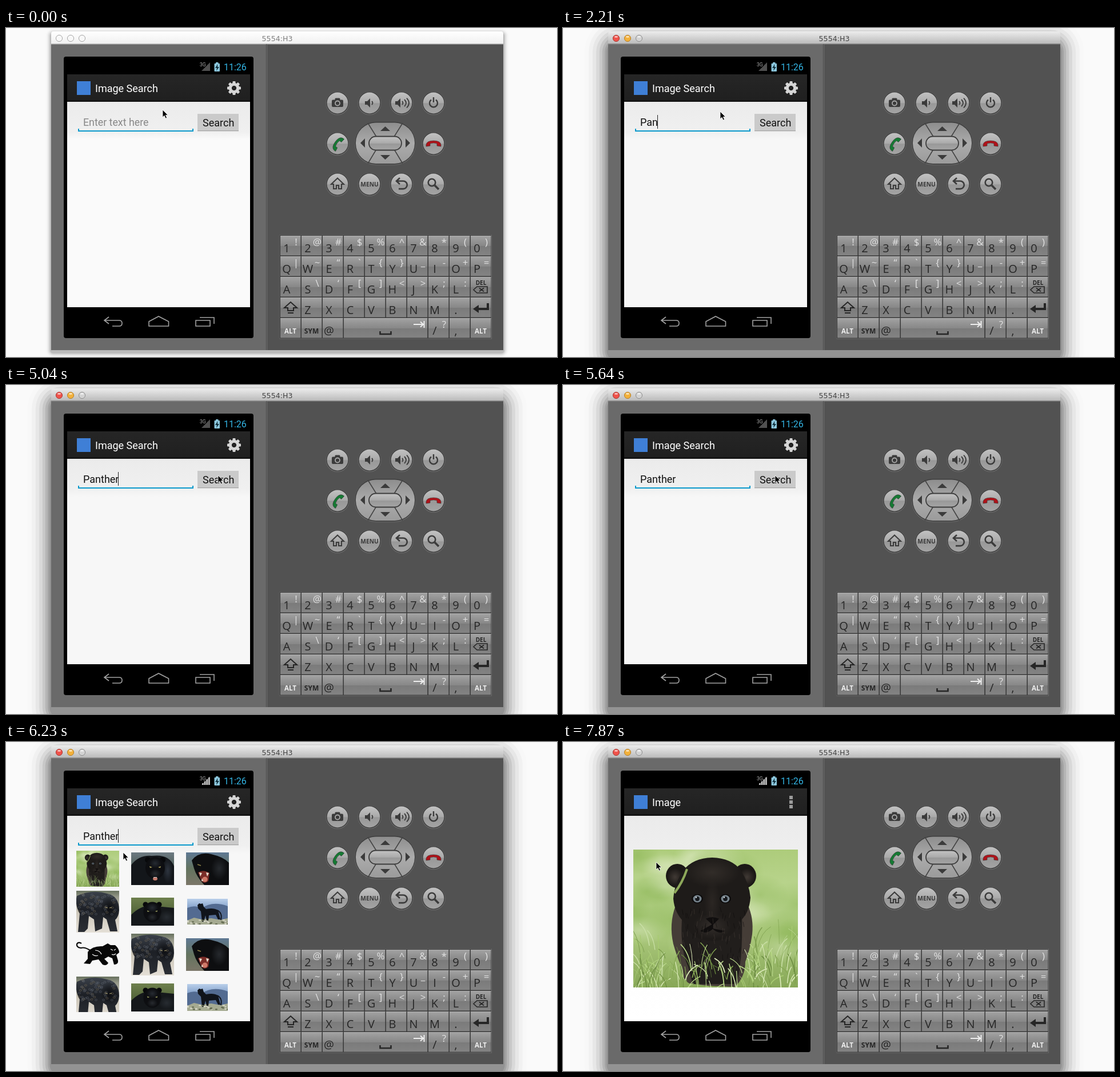
Animation of 964x575 px, one loop 8 s. Source, as an HTML page with a canvas:

```html
<!DOCTYPE html>
<html lang="en">
<head>
<meta charset="utf-8">
<title>Emulator image search</title>
<style>
html, body { margin: 0; width: 100%; height: 100%; overflow: hidden; background: #fafafa; }
canvas { display: block; }
</style>
</head>
<body>
<canvas id="stage" width="964" height="575"></canvas>
<script>
const c = document.getElementById('stage').getContext('2d');
const LOOP = 8000;
const STEPS = [0, 300, 430, 560, 1010, 1460, 1910, 2210, 2510, 2660, 2800, 2950, 3550,
  3840, 3990, 4140, 4290, 4440, 4590, 5040, 5340, 5490, 5640, 5780, 5930, 6080, 6230,
  6380, 6530, 6670, 6970, 7120, 7270, 7420, 7570, 7870];
const TYPED = [1460, 1910, 2210, 2510, 2660, 2800, 2950];
const CARET = [[560, 1010], [1460, 3550], [3990, 4590], [5040, 5490], [6080, 6670], [6970, 7570]];
const MOUSE = [[0, 274, 143], [300, 274, 143], [430, 275, 146], [3690, 275, 146],
  [4440, 371, 158], [5640, 371, 158], [6230, 205, 193], [6530, 163, 210], [8000, 163, 210]];
const UI = 'Roboto, sans-serif', KEY = '"Open Sans", "Noto Sans", sans-serif';

// Drawing helpers
function rect(x, y, w, h, fill) { c.fillStyle = fill; c.fillRect(x, y, w, h); }
function round(x, y, w, h, r, fill, stroke, lw = 1) {
  c.beginPath(); c.roundRect(x, y, w, h, r); paint(fill, stroke, lw);
}
function oval(x, y, rx, ry, fill, stroke, lw = 1) {
  c.beginPath(); c.ellipse(x, y, rx, ry, 0, 0, 7); paint(fill, stroke, lw);
}
function paint(fill, stroke, lw) {
  if (fill) { c.fillStyle = fill; c.fill(); }
  if (stroke) { c.strokeStyle = stroke; c.lineWidth = lw; c.stroke(); }
}
function path(d, fill, stroke, lw = 1) {
  const p = new Path2D(d);
  if (fill) { c.fillStyle = fill; c.fill(p); }
  if (stroke) { c.strokeStyle = stroke; c.lineWidth = lw; c.stroke(p); }
}
function text(s, x, y, size, fill, font = UI, align = 'left', weight = 400) {
  c.font = `${weight} ${size}px ${font}`;
  c.textAlign = align;
  c.fillStyle = fill;
  c.fillText(s, x, y);
}
function grad(y0, y1, ...stops) {
  const g = c.createLinearGradient(0, y0, 0, y1);
  stops.forEach(([p, col]) => g.addColorStop(p, col));
  return g;
}
// Soft spot: rgb is "r,g,b"
function glow(x, y, rx, ry, rgb, alpha) {
  at(x, y, () => {
    c.scale(rx, ry);
    const g = c.createRadialGradient(0, 0, 0, 0, 0, 1);
    g.addColorStop(0, `rgba(${rgb},${alpha})`);
    g.addColorStop(1, `rgba(${rgb},0)`);
    rect(-1, -1, 2, 2, g);
  });
}
function at(x, y, draw, turn = 0) {
  c.save(); c.translate(x, y); c.rotate(turn); draw(); c.restore();
}
function random(seed) {
  return () => (seed = (seed * 16807) % 2147483647) / 2147483647;
}

// Desktop window
function shadow(reach, drop, depth) {
  for (let i = 0; i <= 8; i++) {
    const d = reach * Math.pow(1 - i / 9, 1.5) + 1;
    const v = Math.round(250 - depth * Math.pow(1 - d / (reach + 3), 2.4));
    round(79 - d, 6 + drop - d, 791 + 2 * d, 557 + 2 * d, d + drop, `rgb(${v},${v},${v})`);
  }
}
function desktop(active) {
  rect(0, 0, 964, 575, '#fafafa');
  if (active) shadow(48, 18, 118); else shadow(9, 4, 85);
  const bar = active ? grad(6, 28, [0, '#ececec'], [1, '#b9b9b9']) : grad(6, 28, [0, '#fff'], [1, '#f0f0f0']);
  round(79, 6, 791, 24, [4, 4, 0, 0], bar);
  rect(79, 27.5, 791, 1, active ? '#6c6c6c' : '#a0a0a0');
  const lights = active ? ['#f0524a', '#f3b13b', '#d3d3d3'] : ['#f8f8f8', '#f8f8f8', '#f8f8f8'];
  const rims = active ? ['#a83a35', '#b5802c', '#909090'] : ['#a8a8a8', '#a8a8a8', '#a8a8a8'];
  lights.forEach((col, i) => {
    const x = 93 + 20 * i;
    oval(x, 18, 5.6, 5.6, col, rims[i]);
    if (active) oval(x, 15.3, 3, 1.6, 'rgba(255,255,255,.6)');
  });
  text('5554:H3', 474.5, 22.5, 12.6, active ? '#444' : '#808080', '"DejaVu Sans", sans-serif', 'center');
  rect(79, 28.5, 376, 534.5, '#6a6a6a');
  rect(455, 28.5, 415, 534.5, '#525252');
  rect(455, 28.5, 1, 534.5, '#454545');
  rect(456, 28.5, 1, 534.5, '#757575');
}

// Hardware buttons
const INK = '#3b3b3b';
const ICONS = [
  [580, 131, () => {
    round(-10, -5.5, 20, 12.5, 2, INK);
    round(-4.5, -8.5, 9, 5, 1.5, INK);
    oval(0, .5, 4, 4, INK, '#a8a8a8', 1.8);
  }],
  [636, 131, () => { speaker(-8); path('M4-3q3 3 0 6', null, INK, 1.8); }],
  [692, 131, () => {
    speaker(-11);
    path('M1-3q3 3 0 6M5-6q6 6 0 12M9-8.5q8 8.5 0 17', null, INK, 1.8);
  }],
  [748, 131, () => path('M-4-5.5A7 7 0 1 0 4-5.5M0-10V-1', null, INK, 2.4)],
  [580, 202, () => at(0, 0, () => handset('#157a33'), -.95)],
  [748, 202, () => handset('#b01219')],
  [580, 273, () => path('M-11 0L0-10.500L11 0H7V8H2V2H-2V8H-7V0Z', null, INK, 2)],
  [636, 273, () => text('MENU', 0, 4, 10.3, INK, KEY, 'center', 700)],
  [692, 273, () => path('M-3-11L-9-5.5L-3 0M-9-5.5H3a6.8 6.8 0 0 1 0 13.6H-5', null, INK, 2.6)],
  [748, 273, () => { oval(-3, -3, 6.3, 6.3, null, INK, 2.6); path('M2 2L9 9', null, INK, 3.6); }]
];
function speaker(x) { path(`M${x}-3h4l5-5v16l-5-5h-4Z`, INK); }
function handset(col) {
  path('M-13 5V2Q-12-5 0-5Q12-5 13 2V5L6 4V0Q0-2-6 0V4Z', col, '#333', .6);
}
function hardware() {
  const shine = (y0, y1) => grad(y0, y1, [0, '#c2c2c2'], [.3, '#b4b4b4'], [.5, '#a9a9a9'], [.52, '#989898'], [1, '#a4a4a4']);
  for (const [x, y, icon] of ICONS) {
    oval(x, y + .5, 20.5, 20.5, '#6c6c6c');
    oval(x, y, 19.8, 19.8, '#3c3c3c');
    oval(x, y, 18.4, 18.4, shine(y - 19, y + 19));
    at(x, y, icon);
  }
  round(610, 164.5, 107, 75, 37, '#6c6c6c');
  round(610.5, 164, 106, 74.5, 37, '#3c3c3c');
  round(612, 165.5, 103, 71.5, 35, grad(166, 237, [0, '#8e8e8e'], [.5, '#ababab'], [1, '#9b9b9b']));
  path('M633 166L648 190M694 166L679 190M633 237L648 212M694 237L679 212', null, '#444', 1.6);
  round(635, 189.5, 57, 24, 12, shine(190, 213), '#3c3c3c', 1.8);
  path('M655 180L663.500 172L672 180ZM655 222H672L663.500 230ZM628 193V209L620 201ZM699 193V209L707 201Z', INK);
}

// Keyboard; a row is pairs of main and alternate symbols
const ROWS = ['1!2@3#4$5%6^7&8*9(0)', 'Q|W~E“R`T{Y}U_I-O+P=', 'A S\\D‘F[G]H<J>K;L:  ',
  '  Z X C V B N M . ', '    @         /?, '];
function key(x, y, w) {
  rect(x, y, w, 34.5, grad(y, y + 35, [0, '#a3a3a3'], [.3, '#929292'], [.5, '#888'], [.52, '#7b7b7b'], [1, '#838383']));
  rect(x, y, w, 1, '#b2b2b2');
}
function keyboard() {
  const W = 36.95, H = 36;
  rect(478.500, 361.500, 371.500, 182, '#6c6c6c');
  rect(479, 362, 370, 180.500, '#383838');
  ROWS.forEach((row, r) => {
    for (let i = 0; i < 10; i++) {
      const x = Math.round(480 + i * W), y = 363 + r * H;
      if (r === 4 && i > 3 && i < 7) continue;
      key(x, y, r === 4 && i === 3 ? 4 * W - 1.5 : W - 1.5);
      text(row[2 * i] || ' ', x + 11, y + 29, 20, '#262626', KEY, 'center');
      text(row[2 * i + 1] || ' ', x + 27.500, y + 17, 17, '#e2e2e2', KEY, 'center');
    }
  });
  text('DEL', 831, 449, 10, '#262626', KEY, 'center', 700);
  path('M818 457.500L824 452H842V463H824ZM828 454.500L836 460.500M836 454.500L828 460.500', null, '#262626', 1.6);
  path('M487 489L498 479L509 489H503V494H493V489ZM493 498H503', null, '#262626', 2);
  path('M843 481V491H825', null, '#262626', 4);
  path('M817 491L827 484V498Z', '#262626');
  text('ALT', 497.500, 533.5, 11.6, '#eee', KEY, 'center', 700);
  text('SYM', 534.5, 533.5, 12, '#262626', KEY, 'center', 700);
  text('ALT', 830.500, 533.5, 11.6, '#eee', KEY, 'center', 700);
  path('M654.5 530V535H673.5V530', null, '#262626', 2.6);
  path('M713 518H729M725 513.500L730 518L725 522.500M731.5 512V524', null, '#eee', 2);
}

// Pictures
function photo(x, y, w, h, draw) {
  c.save();
  c.beginPath(); c.rect(x, y, w, h); c.clip();
  c.translate(x, y);
  draw();
  c.restore();
}
function blades(rnd, n, y0, y1, cols) {
  for (let i = 0; i < n; i++) {
    const x = rnd() * 300 - 5, y = y0 + rnd() * (y1 - y0), lean = (rnd() - .5) * 50, len = 14 + rnd() * 36;
    path(`M${x} ${y}q${lean * .2} ${-len * .7} ${lean} ${-len}`, null, cols[i % cols.length], .6 + rnd() * 1.2);
  }
}
function cub() {
  const rnd = random(73);
  rect(0, 0, 288, 241, grad(0, 241, [0, '#adcc7b'], [.4, '#bfd896'], [.65, '#a8c679'], [1, '#87a757']));
  for (let i = 0; i < 26; i++) {
    glow(rnd() * 288, rnd() * 170, 25 + rnd() * 35, 18 + rnd() * 25, i % 2 ? '222,234,196' : '134,178,78', .5);
  }
  blades(rnd, 80, 165, 250, ['#a8cb72', '#7d9f4e', '#c9dfa6']);
  // Body, ears and head
  path('M74 98Q62 130 70 165Q76 186 82 200Q84 226 98 234L130 238L178 240Q196 222 196 196Q204 176 208 148Q211 120 200 96Z', '#453d37');
  path('M86 110Q80 170 96 205L104 235H180Q192 200 190 110Z', '#211e1c');
  for (const s of [-1, 1]) {
    oval(136 + s * 59, 46, 20, 21, '#1b1816');
    glow(136 + s * 63, 48, 14, 15, '74,66,60', .8);
  }
  path('M138 14Q172 15 188 36Q203 60 205 84Q203 110 188 124Q176 150 160 156Q138 163 116 156Q100 150 88 126Q72 110 70 86Q72 58 88 36Q104 15 138 14Z', '#1e1b19');
  glow(138, 40, 48, 26, '58,52,47', .7);
  glow(138, 92, 14, 40, '52,46,42', .6);
  glow(138, 134, 34, 22, '60,54,50', .7);
  path('M128 121Q138 117 149 121L139 131ZM139 130V138Q128 148 118 142M139 138Q150 148 160 142', '#100e0e', '#100e0e', 1.3);
  for (const x of [112, 161]) {
    oval(x, 86, 10, 8, '#0d0c0c');
    oval(x, 86, 7.5, 6.5, '#76838c');
    oval(x, 86, 3.800, 4, '#15181c');
    oval(x - 2, 83.5, 1.2, 1.2, '#dfe6ea');
  }
  for (let i = 0; i < 90; i++) {
    const x = 82 + rnd() * 112, y = 100 + rnd() * 105;
    path(`M${x} ${y}l${(rnd() - .5) * 5} 9`, null, i % 2 ? 'rgba(84,74,66,.4)' : 'rgba(10,9,8,.5)', 1);
  }
  path('M94 34Q86 58 72 76', null, '#8da85a', 4);
  blades(rnd, 110, 205, 262, ['#bad98a', '#86a853', '#dbeab9', '#6a8a40']);
}
function smallCub() { c.scale(75 / 288, 63 / 241); cub(); }
function head(x, y, s, eye) {
  at(x, y, () => {
    c.scale(s, s);
    oval(-13, -14, 5, 5, '#08090b'); oval(13, -14, 5, 5, '#08090b');
    oval(0, 0, 17, 19, '#0d0e11');
    glow(0, -8, 11, 9, '44,50,58', .8);
    glow(0, 10, 10, 8, '46,50,55', .8);
    path('M-10-3l5 2l-4 1zM10-3l-5 2l4 1z', eye);
  });
}
function stalker() {
  rect(0, 0, 75, 57, grad(0, 57, [0, '#6d7a82'], [.5, '#4d5c55'], [1, '#59684a']));
  path('M0 22Q14 4 36 6Q66 2 75 24V57H0Z', '#13161a');
  glow(64, 32, 9, 22, '52,60,72', .8);
  head(42, 27, 1, '#b5a95f');
  oval(42, 46, 4, 3, '#c47a6c');
  path('M39 43.500h6', null, '#ccc', 1);
}
function roar() {
  rect(0, 0, 75, 57, grad(0, 57, [0, '#5f7994'], [.5, '#64745f'], [1, '#7b7668']));
  path('M10 14Q22-2 44 3Q66 8 75 18V57H32Q18 42 14 28Z', '#0d0e10');
  glow(58, 28, 14, 20, '44,48,53', .8);
  path('M21 35Q30 29 41 36L39 50Q32 56 27 50Z', '#7b2d28');
  oval(33, 47, 4.5, 4.5, '#d07a69');
  path('M23 35l2 7l3-6zM35 35l2 7l3-6zM27 50l1-5l2 5z', '#e6dfcf');
  path('M20 21l6 2', null, '#8f8348', 1.5);
}
function walker() {
  rect(0, 0, 75, 73, grad(0, 73, [0, '#66705d'], [.15, '#97998a'], [.5, '#cbc5b8'], [1, '#e4dfd6']));
  path('M1 9Q28-3 54 5Q75 9 75 34Q74 46 68 51L72 71H59L53 50L47 46L45 66L33 71L31 50L22 44L20 66L14 72H3L6 40Q-3 24 1 9Z',
    grad(0, 72, [0, '#3c424b'], [.45, '#1d2026'], [1, '#2b2e34']));
  glow(58, 30, 16, 20, '12,13,16', .9);
  const rnd = random(29);
  for (let i = 0; i < 60; i++) oval(5 + rnd() * 64, 6 + rnd() * 36, 2, 1.5, null, i % 3 ? 'rgba(112,120,132,.55)' : 'rgba(146,128,100,.55)', .8);
  path('M51 29l4 1M62 29l-4 1', null, '#a79d70', 1.2);
}
function watcher() {
  rect(0, 0, 75, 49, grad(0, 49, [0, '#6e804d'], [.6, '#506238'], [1, '#354626']));
  path('M0 30Q16 14 34 14L75 18V49H0Z', '#15181b');
  head(37, 25, .92, '#9a9c60');
  glow(62, 34, 14, 12, '44,49,55', .8);
}
function ridge() {
  rect(0, 0, 71, 47, grad(0, 47, [0, '#b9cfea'], [.3, '#8ca8cf'], [1, '#4d6285']));
  path('M0 16Q14 10 25 17Q44 3 71 13V38H0Z', '#536b91');
  path('M0 38L12 33L25 36L42 34L58 37L71 34V47H0Z', '#a5aa91');
  path('M18 11l3-3l3 1l3-1l2 6l4 4Q46 15 54 20L58 36H54L50 28L38 29L37 38H34L32 29L29 40H26L24 22L19 17Z', '#10141b');
  path('M53 20Q62 25 59 37', null, '#10141b', 1.8);
  const rnd = random(11);
  for (let i = 0; i < 26; i++) oval(rnd() * 71, 37 + rnd() * 9, 2.2, 1.2, i % 2 ? '#d6d6c6' : '#646b52');
}
function emblem() {
  path('M24 17Q15 11 8 13Q0 12 1 6Q3 2 9 5', null, '#080808', 2.2);
  path('M20 20Q28 9 46 10L55 5L60 8L68 8Q75 14 75 21L70 25L73 35Q74 42 66 42L63 31L56 28L49 32L56 39Q53 45 46 42L39 33L28 35L24 41L13 40L20 32Z', '#080808');
  path('M60 15l4 2M69 15l-3 2M62 24q4 2 7-1M33 17q8 0 11 7M28 24q5 4 10 2', null, '#f7f7f7', 1.2);
}
const RESULTS = [
  [123, 190, 75, 63, smallCub], [219, 193, 75, 57, stalker], [315, 193, 75, 57, roar],
  [123, 260, 75, 73, walker], [219, 272, 75, 49, watcher], [317, 274, 71, 45, ridge],
  [123, 347, 75, 47, emblem], [219, 335, 75, 73, walker], [315, 343, 75, 57, roar],
  [123, 410, 75, 62, walker], [219, 422, 75, 49, watcher], [317, 423, 71, 47, ridge]
];

// Phone
function phone(t) {
  round(101, 50, 332, 492, 4, '#000');
  text('3G', 339, 67, 8.5, '#aaa', UI);
  path('M357 60V75H342Z', '#505050');
  if (t >= 5780) for (let i = 0; i < 4; i++) rect(343 + i * 3.7, 72 - i * 3.4, 2.6, 3 + i * 3.4, '#bcbcbc');
  round(364.5, 62, 9.5, 14, 1, '#8cc7dd');
  rect(367, 60, 4.500, 2, '#8cc7dd');
  path('M370.5 63L366 70H369L368 75L373 68H370Z', '#12323f');
  text('11:26', 381, 74, 16, '#33b5e5');
  path('M180 505L172 511L180 517M172 511H198Q203 511 203 516T198 521H186', null, '#a2a2a2', 1.6);
  path('M250 521V513L267 504L284.5 513V521Z', null, '#a2a2a2', 1.6);
  path('M332 511H357V521H332ZM339 506H364V517', null, '#a2a2a2', 1.6);
}
function actionBar(title) {
  rect(107, 81, 320, 48, grad(81, 129, [0, '#262626'], [.92, '#202020'], [.96, '#141414'], [1, '#111']));
  rect(124, 93, 24, 24, '#3f7fd6');
  text(title, 156, 112, 18, '#fff');
}
function gear() {
  for (let i = 0; i < 8; i++) at(399, 105, () => round(-2.500, -12, 5, 8, 1, '#d6d6d6'), i * Math.PI / 4);
  oval(399, 105, 7, 7, null, '#d6d6d6', 4.6);
}
function searchPage(t) {
  const blurred = t >= 6970;
  rect(107, 129, 320, 359, grad(129, 195, [0, '#ebebeb'], [.8, '#f0f0f0'], [1, t < 300 ? '#fafafa' : '#f7f7f7']));
  actionBar('Image Search');
  gear();
  const word = 'Panther'.slice(0, TYPED.filter(at => at <= t).length);
  if (word) text(word, 135, 171, 18, '#111');
  else text('Enter text here', 135, 171, 17.8, '#888');
  if (CARET.some(([on, off]) => t >= on && t < off)) {
    c.font = `400 18px ${UI}`;
    rect(Math.round(134 + c.measureText(word).width), 152, 1, 24, '#222');
  }
  if (blurred) path('M127.500 176V179.500H326.500V176', null, '#999', 1);
  else path('M127 176V180H327V176', null, '#0a99cc', 2);
  const pressed = t >= 4440 && t < 4590;
  if (pressed) round(331, 146, 80, 38, 3, 'rgba(51,181,229,.35)');
  rect(335, 150, 72, 30, pressed ? '#8ecde3' : '#cacaca');
  rect(335, 179, 72, 1.3, '#a4a4a4');
  text('Search', 344, 172, 18, '#111');
  const shown = t < 5780 ? 0 : t < 5930 ? 6 : 12;
  RESULTS.slice(0, shown).forEach(r => photo(...r));
  if (blurred) rect(107, 129, 320, 359, 'rgba(0,0,0,.05)');
}
function imagePage(t) {
  rect(107, 129, 320, 359, grad(129, 488, [0, '#ebebeb'], [.15, '#eee'], [.6, '#fdfdfd'], [1, '#fff']));
  actionBar('Image');
  for (let i = 0; i < 3; i++) rect(396, 94 + 8 * i, 6, 6, '#9b9b9b');
  if (t >= 7870) photo(123, 188, 288, 241, cub);
}
function app(t) {
  c.save();
  c.beginPath(); c.rect(107, 81, 320, 407); c.clip();
  if (t < 7570) searchPage(t);
  const k = Math.min(1, (t - 6970) / 600);
  if (k > 0) {
    const s = .775 + .225 * k;
    c.globalAlpha = k;
    c.translate(267, 271); c.scale(s, s); c.translate(-267, -271);
    imagePage(t);
  }
  c.restore();
}
function pointer(t) {
  const i = MOUSE.findIndex(m => m[0] > t);
  const [t0, x0, y0] = MOUSE[i - 1], [t1, x1, y1] = MOUSE[i];
  const p = (t - t0) / (t1 - t0), e = p * p * (3 - 2 * p);
  at(x0 + (x1 - x0) * e, y0 + (y1 - y0) * e, () =>
    path('M0 0V13L3 10.200L5.200 15L7.500 14L5.300 9.300H9.300Z', '#000', '#fff', .8));
}

let last = -1;
function tick() {
  const now = performance.now() % LOOP;
  const t = STEPS.filter(s => s <= now).pop();
  if (t !== last) {
    last = t;
    desktop(t >= 300);
    hardware();
    keyboard();
    phone(t);
    app(t);
    pointer(t);
  }
  requestAnimationFrame(tick);
}
tick();
</script>
</body>
</html>
```
